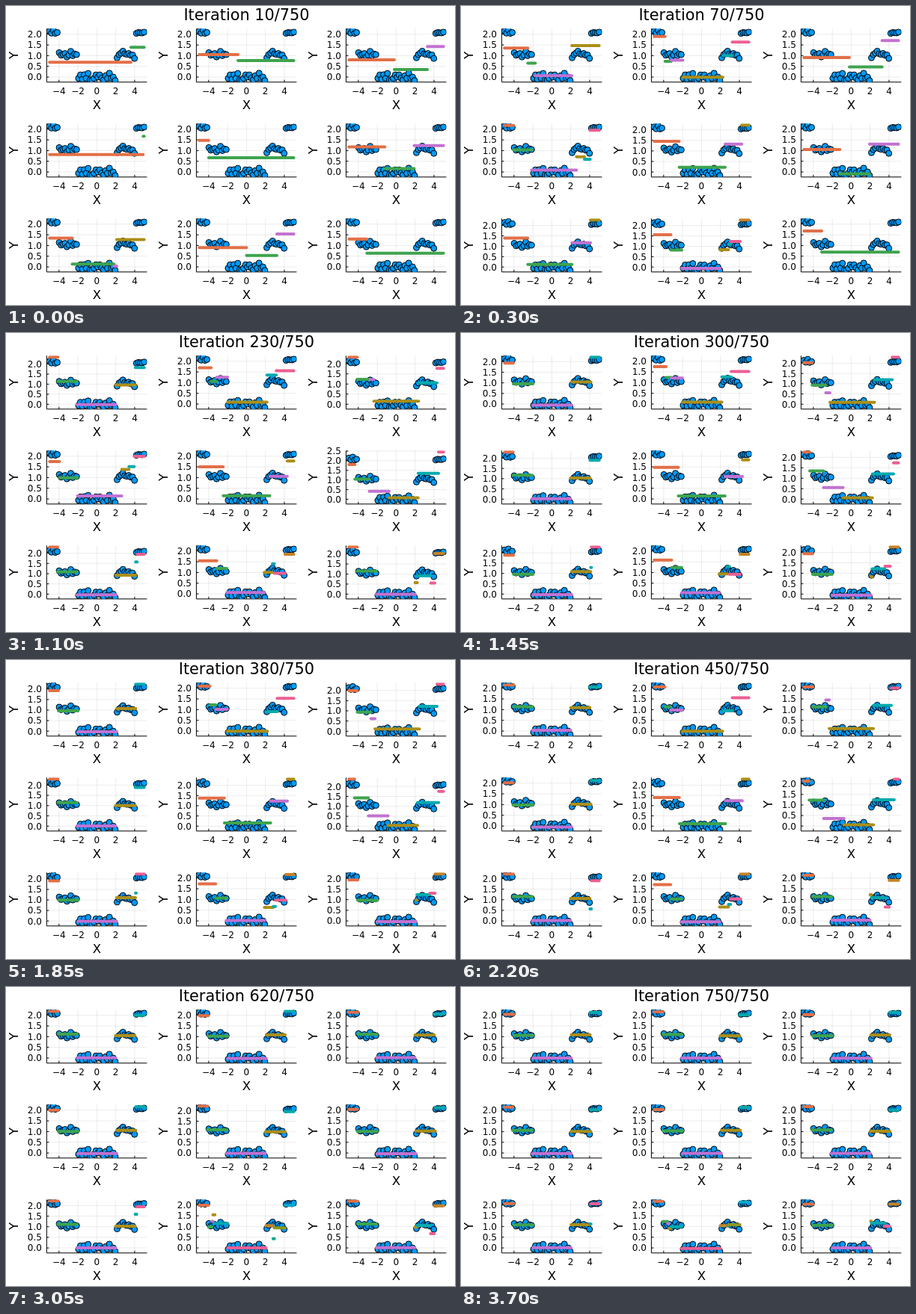
Recreate the animation shown at these times as an HTML page with a canvas. Size 600 by 400 pixels, loop 3750 ms.

```html
<!DOCTYPE html>
<html lang="en">
<head>
<meta charset="utf-8">
<title>Step function sampling</title>
<style>
html, body { margin: 0; width: 100%; height: 100%; overflow: hidden; background: #fff; }
canvas { display: block; }
</style>
</head>
<body>
<canvas id="stage" width="600" height="400"></canvas>
<script>
const ctx = document.getElementById('stage').getContext('2d');
const STEP = 50, COUNT = 75;
const FONT = '"DejaVu Sans", sans-serif';
const COLORS = ['#e36f47', '#3ea44e', '#c371d2', '#ac8e18', '#00aaae', '#ed5e93',
  '#c68225', '#00a98d', '#8e971e', '#00a9cc', '#9b7fe9', '#618df6'];
const PAD = { left: 54, right: 12, wide: 10 };
const HEIGHT = 71.5;

// Noisy samples of a five-level step function on an even grid over [-5, 5].
const noise = [
  .14, .05, .19, .04, .08,
  .14, .02, .06, .1, -.06, .03, .2, 0, .08, .05,
  -.06, .1, -.1, .11, -.06, .17, -.13, -.14, -.06, .1,
  0, .1, -.05, -.13, .06, -.06, .18, -.05, 0, -.165,
  -.1, .05, .12, .21, .09, .06, .1, .02, .03, -.13,
  .04, .08, .07, .06, .1];
const points = noise.map((d, i) => {
  const x = -5 + i * 10 / 49, r = Math.abs(x);
  return [x, d + (r > 4 ? 2 : r > 2 ? 1 : 0)];
});
const ys = points.map(p => p[1]);
const LOW = Math.min(...ys), HIGH = Math.max(...ys);
const MEAN = ys.reduce((a, b) => a + b) / ys.length;

// Each chain begins with a few cuts, explores others, then settles on the true ones.
const TRUE_CUTS = [-4.08, -2.04, 2.04, 4.08];
const chain = (start, early, settle, extra = []) =>
  ({ start, early, settle, late: [...TRUE_CUTS, ...extra] });
const chains = [
  chain([3.6], [-2.6, -1.8, 2.1], 17),
  chain([-.9], [-3.8, -3.2, -2, 2.2, 3.2], 45),
  chain([-.2, 3.3], [-4.1, -2.7, -2.3, 2.4, 4.3], 45),
  chain([4.9], [-4, -2.1, 2.6, 3.4, 4], 27),
  chain([-4], [-2.4, 2.5, 4.3], 57),
  chain([-1.2, 1.9], [-4.4, -2.9, -.8, 2.3, 4.5], 45),
  chain([-2.6, 1.8, 2.1], [-2.6, 2.1, 4.1], 17, [4.2]),
  chain([0, 3.2], [-3.2, -2.1, 1.9, 2.8, 3, 4.1], 45, [-3.6, -3.5, -3.3, 2.8, 2.9]),
  chain([-3.1], [-4, -1, -.4, .6, 1.5, 1.9], 17, [2.2, 3.6]),
];

// Scattered value in [-1, 1] that is redrawn every three steps.
const wobble = (panel, i, step) =>
  Math.sin(2.4 * panel + 5.54 * i + 2 * Math.floor((step + panel) / 3));

// Each level is the mean of the points it covers, pulled early on to the overall mean.
function segmentsAt(panel, step) {
  const { start, early, settle, late } = chains[panel];
  const birth = 3 + panel % 3 * 2;
  const base = step < birth ? start : step < settle ? early : late;
  const cuts = base.map((c, i) => step ? c + .06 * wobble(panel, i + 20, step) : c);
  const edges = [-5, ...cuts.sort((a, b) => a - b), 5];
  const prior = 2 * Math.exp(-step / 4);
  return edges.slice(1).map((to, i) => {
    const inside = points.filter(([x]) => x >= edges[i] && (x < to || to === 5));
    const sum = inside.reduce((s, p) => s + p[1], prior * MEAN);
    const spread = Math.min(.5, (1.6 - step / 60) / inside.length);
    const y = sum / (inside.length + prior) + spread * wobble(panel, i, step);
    return { from: edges[i], to, y };
  });
}

function line(x1, y1, x2, y2) {
  ctx.beginPath();
  ctx.moveTo(x1, y1);
  ctx.lineTo(x2, y2);
  ctx.stroke();
}

function text(str, x, y, size, align = 'center') {
  ctx.font = `${size}px ${FONT}`;
  ctx.textAlign = align;
  ctx.fillStyle = '#000';
  ctx.fillText(str, x, y);
}

function fitRange(segments) {
  const levels = segments.map(s => s.y);
  const lo = Math.min(LOW, ...levels), hi = Math.max(HIGH, ...levels);
  const pad = (hi - lo) * .03;
  return { segments, lo: lo - pad, hi: hi + pad, wide: lo - pad <= -.5 };
}

function drawPanel({ segments, lo, hi, wide }, left, top, width) {
  const bottom = top + HEIGHT;
  const px = x => left + (x + 5.3) / 10.6 * width;
  const py = y => bottom - (y - lo) / (hi - lo) * HEIGHT;
  const xTicks = [-4, -2, 0, 2, 4], yTicks = [];
  for (let y = Math.ceil(lo * 2) / 2; y <= hi; y += .5) yTicks.push(y);

  ctx.lineCap = 'butt';
  ctx.lineWidth = 1;
  ctx.strokeStyle = 'rgba(0,0,0,.08)';
  xTicks.forEach(x => line(px(x), top, px(x), bottom));
  yTicks.forEach(y => line(left, py(y), left + width, py(y)));

  ctx.strokeStyle = '#000';
  line(left, bottom, left + width, bottom);
  line(left, top, left, bottom);
  xTicks.forEach(x => {
    line(px(x), bottom, px(x), bottom - 3);
    text(String(x).replace('-', '−'), px(x), bottom + 16, 12);
  });
  yTicks.forEach(y => {
    line(left, py(y), left + 3, py(y));
    text((y < 0 ? '−' : '') + Math.abs(y).toFixed(1), left - 6.5, py(y) + 4.4, 12, 'right');
  });
  text('X', left + width / 2, bottom + 36, 16.5);
  ctx.save();
  ctx.translate(left - 38 - (wide ? PAD.wide : 0), top + HEIGHT / 2);
  ctx.rotate(-Math.PI / 2);
  text('Y', 0, 0, 16.5);
  ctx.restore();

  ctx.save();
  ctx.beginPath();
  ctx.rect(left, top, width, HEIGHT);
  ctx.clip();
  ctx.fillStyle = '#009afa';
  points.forEach(([x, y]) => {
    ctx.beginPath();
    ctx.arc(px(x), py(y), 4, 0, 7);
    ctx.fill();
    ctx.stroke();
  });
  ctx.lineCap = 'round';
  ctx.lineWidth = 4;
  segments.forEach(({ from, to, y }, i) => {
    ctx.strokeStyle = COLORS[i];
    line(px(from), py(y), px(to), py(y));
  });
  ctx.restore();
}

function draw(step) {
  ctx.fillStyle = '#fff';
  ctx.fillRect(0, 0, 600, 400);
  const panels = chains.map((_, i) => fitRange(segmentsAt(i, step)));
  const extra = [0, 1, 2].map(c => panels.some((p, i) => i % 3 === c && p.wide) ? PAD.wide : 0);
  const width = 200 - PAD.left - PAD.right - (extra[0] + extra[1] + extra[2]) / 3;
  let left = .4;
  for (let col = 0; col < 3; col++) {
    left += PAD.left + extra[col];
    for (let row = 0; row < 3; row++) drawPanel(panels[row * 3 + col], left, 30.3 + row * 127, width);
    if (col === 1) text(`Iteration ${(step + 1) * 10}/750`, left + width / 2, 18.5, 20.8);
    left += width + PAD.right;
  }
}

const start = performance.now();
function tick() {
  draw(Math.floor((performance.now() - start) / STEP) % COUNT);
  requestAnimationFrame(tick);
}
tick();
</script>
</body>
</html>
```
